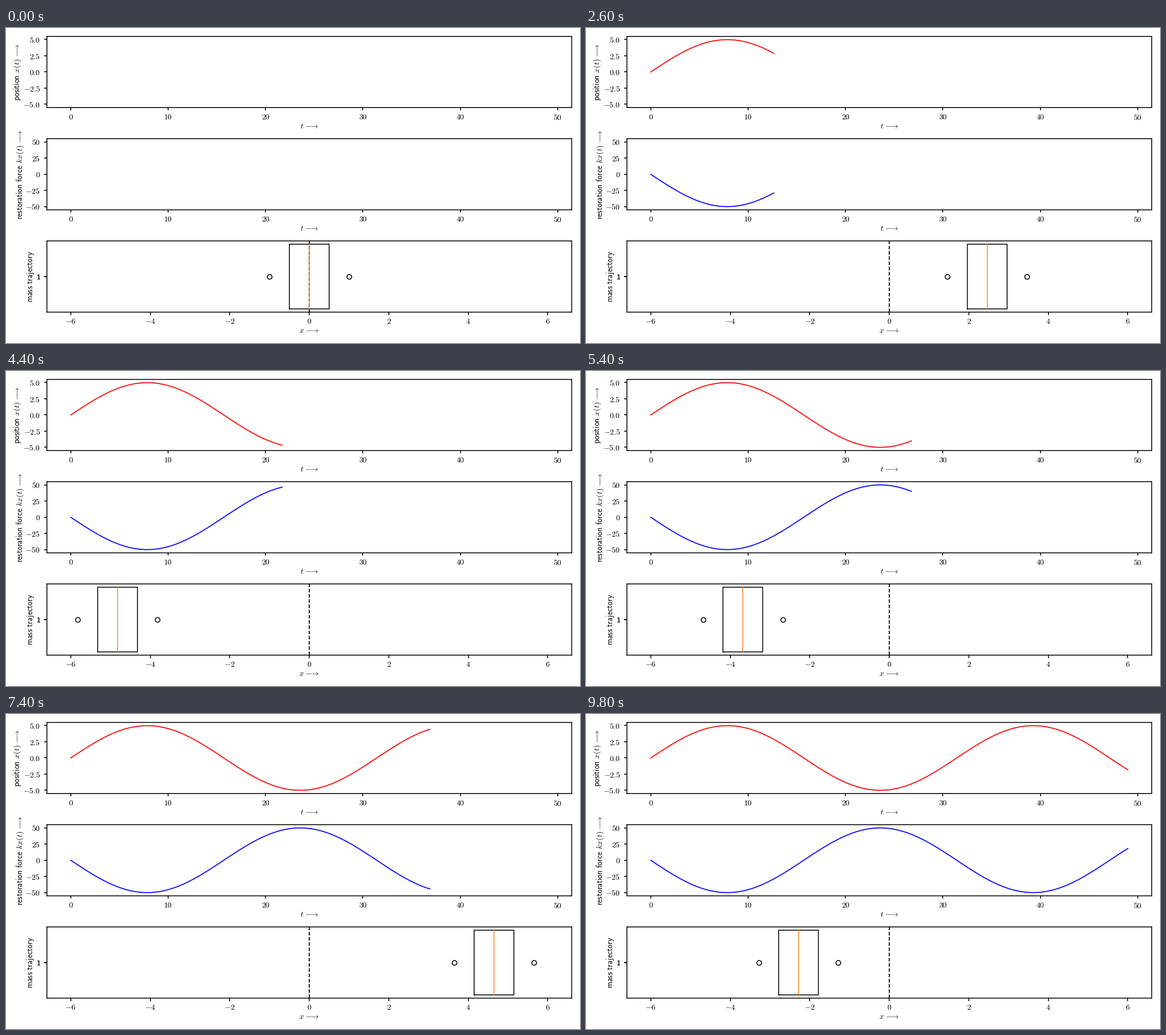
Animation of 1009x555 px, one loop 10 s. Source, as a matplotlib script:

```python
import numpy as np
import matplotlib.pyplot as plt
from matplotlib.animation import FuncAnimation

W, H, DPI = 1009, 555, 100
AMP, OMEGA, K = 5, 0.2, 10
FRAMES, STRIDE = 50, 2
THIN, CURVE = 1.1, 1.25

plt.rcParams.update({
    "font.family": "Liberation Serif",
    "mathtext.fontset": "cm",
    "font.size": 10,
    "path.snap": False,
    "axes.linewidth": THIN,
    "xtick.major.width": THIN,
    "ytick.major.width": THIN,
    "xtick.major.pad": 4.3,
    "ytick.major.pad": 4.8,
})

t = np.linspace(0, 50, FRAMES * STRIDE)
pos = AMP * np.sin(OMEGA * t)
force = -K * pos
t_last = t[STRIDE * (FRAMES - 1) - 1]

# Long arrow built from a minus sign and a right arrow
ARROW = r"\hspace{0.316}{-}\hspace{-0.39}\rightarrow"
SPACE = r"\hspace{0.38}"

fig = plt.figure(figsize=(W / DPI + 1e-9, H / DPI + 1e-9), dpi=DPI,
                 facecolor="white")


def panel(top, xlim, ylim):
    """Axes whose frame starts at pixel row `top`."""
    left, width, height = 71.9, 922.5, 125.4
    ax = fig.add_axes([left / W, 1 - (top + height) / H, width / W, height / H])
    ax.set_xlim(xlim)
    ax.set_ylim(ylim)
    return ax


def label(x, y, text, rotation=0):
    """Text centred along its direction, baseline at pixel (x, y)."""
    fig.text(x / W, 1 - y / H, f"${text}$", ha="center", va="baseline",
             rotation=rotation, rotation_mode="anchor")


def ticks(setter, values, fmt="{:d}"):
    setter(values, [f"${fmt.format(v)}$" for v in values])


t_lim = (-0.05 * t_last, 1.05 * t_last)
ax_pos = panel(14.8, t_lim, (-1.1 * AMP, 1.1 * AMP))
ax_force = panel(195, t_lim, (-1.1 * AMP * K, 1.1 * AMP * K))
ax_mass = panel(375.2, (-6.6, 6.6), (0.45, 1.55))

for ax in (ax_pos, ax_force):
    ticks(ax.set_xticks, range(0, 51, 10))
ticks(ax_pos.set_yticks, [-5.0, -2.5, 0.0, 2.5, 5.0], "{:.1f}")
ticks(ax_force.set_yticks, range(-50, 51, 25))
ticks(ax_mass.set_xticks, range(-6, 7, 2))
# Repeated tick gives the heavier "1"
ticks(ax_mass.set_yticks, [1] * 5, r"\mathsf{{{:d}}}")

label(533, 177, "t" + ARROW)
label(533, 357.2, "t" + ARROW)
label(533, 537.4, "x" + ARROW)
label(24, 78, r"\mathsf{position}" + SPACE + "x(t)" + ARROW, 90)
label(29, 258, r"\mathsf{restoration}" + SPACE + r"\mathsf{force}" + SPACE
      + "kx(t)" + ARROW, 90)
label(46.5, 438, r"\mathsf{mass}" + SPACE + r"\mathsf{trajectory}", 90)

pos_line, = ax_pos.plot([], [], color="red", lw=CURVE)
force_line, = ax_force.plot([], [], color="blue", lw=CURVE)
ax_mass.axvline(0, color="black", ls="--", lw=CURVE)
box, = ax_mass.plot([], [], color="black", lw=THIN)
ends, = ax_mass.plot([], [], "o", mfc="none", mec="black", mew=THIN, ms=6)
middle, = ax_mass.plot([], [], color="C1", lw=1, zorder=2.1)


def update(i):
    n = STRIDE * i
    x = pos[n]
    pos_line.set_data(t[:n], pos[:n])
    force_line.set_data(t[:n], force[:n])
    lo, hi = x - 0.5, x + 0.5
    box.set_data([lo, hi, hi, lo, lo], [0.5, 0.5, 1.5, 1.5, 0.5])
    ends.set_data([x - 1, x + 1], [1, 1])
    middle.set_data([x, x], [0.5, 1.5])
    return pos_line, force_line, box, ends, middle


anim = FuncAnimation(fig, update, frames=FRAMES, interval=200, repeat=True)
plt.show()
```
